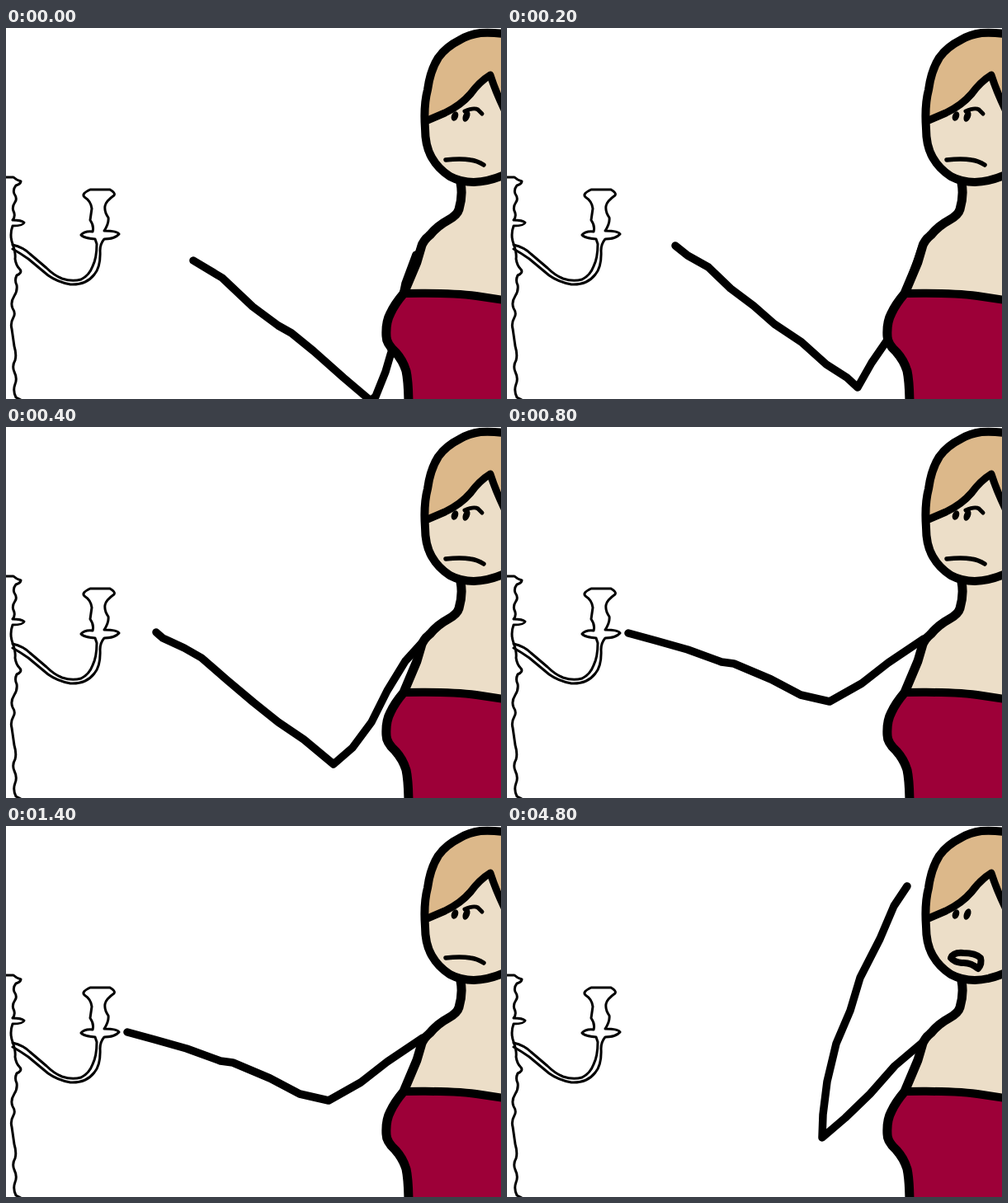
These frames come from a looping animation (600x450 px, 6800 ms). An HTML page:

```html
<!DOCTYPE html>
<html lang="en">
<head>
<meta charset="utf-8">
<title>Reaching arm</title>
<style>
  html, body { margin: 0; width: 100%; height: 100%; overflow: hidden; background: #fff; }
  svg { display: block; width: 100%; height: 100%; }
  .line { fill: none; stroke: #000; stroke-linecap: round; stroke-linejoin: round; }
  .skin { fill: #ecdec8; }
</style>
</head>
<body>
<svg viewBox="0 0 600 450">
  <g id="candelabra" class="line" stroke-width="3">
    <path d="M-3 181H9Q12 184 18 186Q18 189 12 191Q8 196 10 201Q14 207 11 211Q7 217 9 222Q12 228 8 233
      Q19 233 22 236Q21 240 8 240Q4 251 8 262Q12 273 11 280Q12 288 17 293Q20 297 13 300Q10 306 13 312
      Q14 319 10 325Q5 333 8 340Q12 346 9 351Q5 358 7 365L10 386Q13 396 11 403Q7 410 10 417
      Q14 425 11 432Q8 440 12 448L18 451"/>
    <path d="M8 263Q21 266 29 274L49 291Q58 300 68 304Q80 308 91 305Q101 300 105 289Q110 279 110 262
      L108 256Q94 255 91 251Q95 246 105 247Q107 240 102 233Q103 226 104 219Q103 210 95 205
      Q91 201 102 196H126Q133 200 131 203Q121 210 120 216Q119 223 124 230Q125 237 119 246
      Q135 246 137 250Q132 256 119 256Q114 262 114 270Q115 290 107 299Q97 312 78 311
      Q62 308 51 300L27 280Q17 273 8 268"/>
  </g>

  <polyline id="arm" class="line" stroke-width="9.5"/>

  <g id="body" stroke-width="11">
    <path class="skin" d="M551 180Q554 203 549 220Q547 227 536 233Q523 240 514 251Q505 258 503 267
      L498 284L482 322L610 330V180Z"/>
    <path fill="#9d0038" d="M482 322Q540 321 570 325L610 331V460H488Q488 430 485 416Q481 403 472 393
      Q461 383 461 374Q460 357 466 346Q471 335 482 322Z"/>
    <path class="line" d="M551 188Q554 203 549 220Q547 227 536 233Q523 240 514 251Q505 258 503 267
      L498 284L482 322Q471 335 466 346Q460 357 461 374Q461 383 472 393Q481 403 485 416Q488 430 488 460"/>
    <path class="line" stroke-width="10" d="M482 322Q540 321 570 325L610 331"/>
  </g>

  <g id="head" stroke-width="10">
    <path id="skull" class="skin" d="M610 8Q592 5 575 6Q561 8 551 14Q533 23 524 36Q514 52 511 75
      Q506 94 508 122Q508 143 516 157Q524 171 538 180Q551 187 567 187Q590 186 610 175Z"/>
    <path fill="#dcb88a" d="M610 8Q592 5 575 6Q561 8 551 14Q533 23 524 36Q514 52 511 75L508 112
      L532 103Q551 94 563 80Q574 65 587 57Q593 76 604 99Z"/>
    <path class="line" d="M610 8Q592 5 575 6Q561 8 551 14Q533 23 524 36Q514 52 511 75Q506 94 508 122
      Q508 143 516 157Q524 171 538 180Q551 187 567 187Q590 186 610 175"/>
    <path class="line" stroke-width="9" d="M511 112L532 103Q551 94 563 80Q574 65 587 57Q593 76 604 99"/>
    <ellipse cx="544" cy="107" rx="4" ry="6" transform="rotate(22 544 107)"/>
    <ellipse cx="558" cy="107" rx="4" ry="7" transform="rotate(22 558 107)"/>
    <g id="frown" class="line" stroke-width="5">
      <path d="M556 101Q567 96 572 99L577 104"/>
      <path stroke-width="5.5" d="M533 160Q551 158 563 160Q571 161 579 166"/>
    </g>
    <path id="gasp" class="line" stroke-width="8" d="M538 160Q541 153 553 154Q568 154 574 160
      Q576 167 571 173Q562 165 551 166Q542 165 538 160Z"/>
  </g>
</svg>
<script>
const LOOP = 6800;

// Each pose holds until the next start time; points run from hand to shoulder.
const poses = [
  { start: 0, arm: "227,282 262,303 299,338 330,361 346,370 373,392 409,424 442,452 448,447 460,417 467,393 484,310 497,275" },
  { start: 200, arm: "204,264 219,276 244,290 271,316 299,337 324,359 357,381 387,408 412,424 425,436 442,406 462,377 484,320 503,266" },
  { start: 400, arm: "182,249 190,256 216,268 237,280 268,307 300,334 330,358 361,379 397,409 420,389 443,358 462,320 484,284 503,263" },
  { start: 600, arm: "157,251 186,259 208,270 235,281 270,304 318,329 352,353 377,368 393,373 424,333 463,292 490,270 513,251" },
  { start: 800, arm: "147,250 180,259 219,270 260,285 275,287 320,306 356,325 391,333 430,311 462,286 505,257" },
  { start: 1800, arm: "485,73 469,97 452,137 428,184 416,224 399,264 388,310 383,350 382,378 410,354 440,325 470,291 503,263", gasping: true }
];

const byId = id => document.getElementById(id);
const show = (id, visible) => byId(id).setAttribute("visibility", visible ? "visible" : "hidden");

let current;
function draw() {
  const time = performance.now() % LOOP;
  const pose = poses.findLast(p => p.start <= time);
  if (pose !== current) {
    current = pose;
    byId("arm").setAttribute("points", pose.arm);
    show("frown", !pose.gasping);
    show("gasp", pose.gasping);
  }
  requestAnimationFrame(draw);
}
draw();
</script>
</body>
</html>
```
